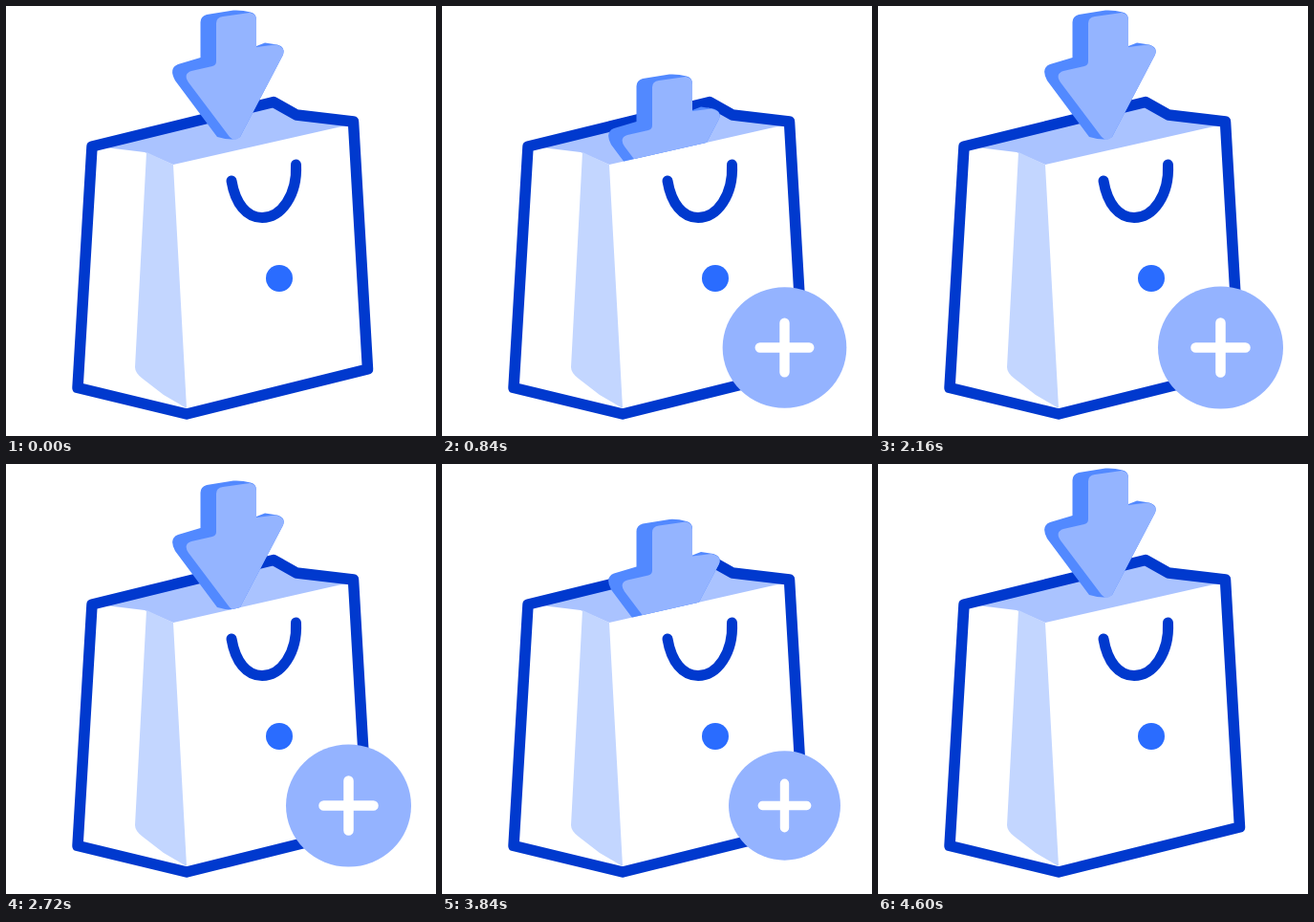
Animation of 450x450 px, one loop 4640 ms. Source, as an HTML page:

```html
<!DOCTYPE html>
<html lang="en">
<head>
<meta charset="utf-8">
<title>Add to bag</title>
<style>
  html, body { margin: 0; width: 100%; height: 100%; overflow: hidden; background: #fff; }
  svg { display: block; width: 100%; height: 100%; }
</style>
</head>
<body>
<svg viewBox="0 0 450 450" stroke-linecap="round" stroke-linejoin="round">
  <!-- Everything above the front edge of the bag -->
  <clipPath id="opening"><path d="M0 0H450V105L356 125L175 166L145 153L0 140Z"/></clipPath>

  <path d="M104 148L280 103L304 118L356 125L175 166L145 153Z" fill="#aac3ff"/>
  <path d="M147 153L175 166L189 421L165 407L143 390Q135 384 135 378Z" fill="#c3d6ff"/>
  <path d="M90 147L280 100.500L304 114L363.500 121L378.500 380L189 427L75 399.500Z" fill="none" stroke="#0039ce" stroke-width="11.500"/>
  <path d="M236 183C240 207 252 221.500 268 221.500C288 221.500 305 198 303.500 166" fill="none" stroke="#0039ce" stroke-width="11"/>
  <circle cx="286" cy="285" r="14" fill="#2a6cff"/>

  <g clip-path="url(#opening)">
    <g id="arrow">
      <path d="M203.500 17Q203.500 11 210 9L238 4.500Q247 4 256 6.500Q262 8 262 14V42L271 38.500L284 40.500Q293 43 290 51L245 137Q239 142 221 137L177 78Q170 65 180 61L203.500 54Z" fill="#5289ff"/>
      <path d="M220 18Q220 12 227 11L255 7Q262 8 262 15V43L282 40.500Q293 43 290 51L245 137Q240 143 234 137L191 80Q185 71 194 68L216 63Q220 62 220 58Z" fill="#94b4ff"/>
    </g>
  </g>

  <g id="badge">
    <ellipse rx="65.500" ry="64" fill="#94b3ff"/>
    <path d="M-26 0H26M0 -26V26" stroke="#fff" stroke-width="10.500"/>
  </g>
</svg>
<script>
  const LOOP = 4640, CYCLE = 2280, HALF = 1100, DROP = 69;
  const arrow = document.getElementById('arrow');
  const badge = document.getElementById('badge');

  // Ease in and out, from 0 to 1 over the given span
  function ease(t, start, duration, power) {
    const u = Math.min(1, Math.max(0, (t - start) / duration));
    return u < 0.5 ? (2 * u) ** power / 2 : 1 - (2 - 2 * u) ** power / 2;
  }

  function draw(now) {
    const t = now % LOOP;
    const phase = t < 2 * CYCLE ? t % CYCLE : 0;
    const y = DROP * (ease(phase, 10, HALF, 4) - ease(phase, HALF + 10, HALF, 4));
    const scale = ease(t, 240, 695, 3) - ease(t, 3633, 695, 3);
    arrow.setAttribute('transform', `translate(0 ${y})`);
    badge.setAttribute('transform', `translate(358.500 357.500) scale(${scale})`);
    requestAnimationFrame(draw);
  }
  draw(0);
</script>
</body>
</html>
```
